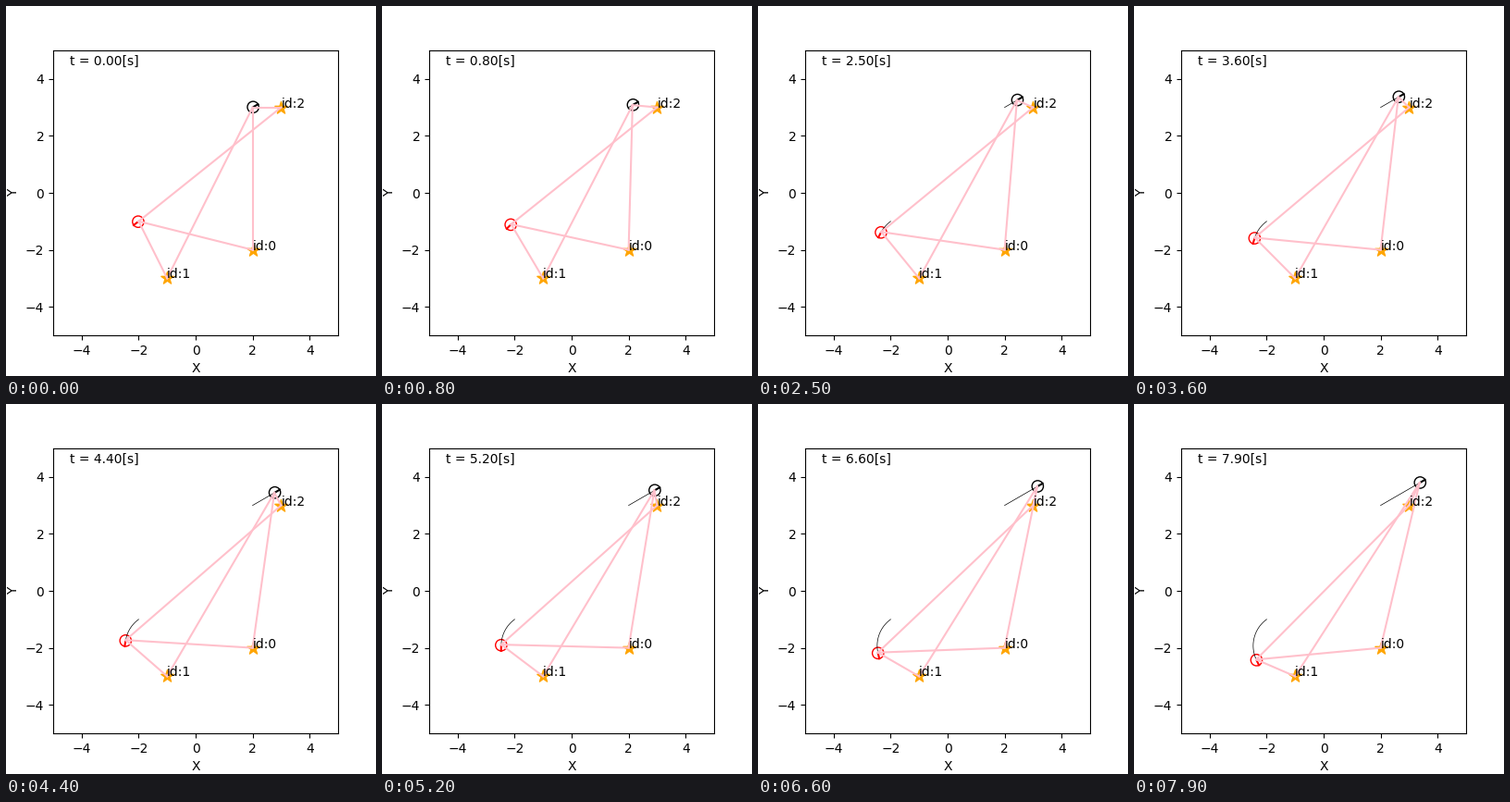
A matplotlib script that plays this animation: 400 by 400 pixels, repeating every 8 s.

```python
import numpy as np
import matplotlib.pyplot as plt
from matplotlib.animation import FuncAnimation
from matplotlib.patches import Circle

DT = 0.1
FRAMES = 80
RADIUS = 0.2
LANDMARKS = [(2, -2), (-1, -3), (3, 3)]


class Robot:
    """Moves with constant speed nu and turn rate omega, sighting every landmark."""

    def __init__(self, ax, start, nu, omega, color):
        self.start, self.nu, self.omega = start, nu, omega
        self.heading, = ax.plot([], [], color=color)
        self.body = ax.add_patch(Circle(start[:2], RADIUS, fill=False, color=color))
        self.trail, = ax.plot([], [], linewidth=0.5, color="black")
        self.sights = [ax.plot([], [], color="pink")[0] for _ in LANDMARKS]

    def pose(self, t):
        x, y, a = self.start
        b = a + self.omega * t
        if self.omega == 0:
            return x + self.nu * t * np.cos(a), y + self.nu * t * np.sin(a), b + 0 * t
        r = self.nu / self.omega
        return x + r * (np.sin(b) - np.sin(a)), y + r * (np.cos(a) - np.cos(b)), b

    def update(self, step):
        xs, ys, angles = self.pose(DT * np.arange(step + 1))
        x, y, a = xs[-1], ys[-1], angles[-1]
        self.heading.set_data([x, x + RADIUS * np.cos(a)], [y, y + RADIUS * np.sin(a)])
        self.body.center = x, y
        self.trail.set_data(xs, ys)
        # Sightings lag one step behind the body.
        for line, (lx, ly) in zip(self.sights, LANDMARKS):
            line.set_data([xs[-2], lx], [ys[-2], ly])


fig = plt.figure(figsize=(4, 4), dpi=100)
ax = fig.add_subplot(111)
ax.set_aspect("equal")
ax.set_xlim(-5, 5)
ax.set_ylim(-5, 5)
ax.set_xlabel("X", fontsize=10)
ax.set_ylabel("Y", fontsize=10)

clock = ax.text(-4.4, 4.5, "", fontsize=10)
for i, (lx, ly) in enumerate(LANDMARKS):
    ax.scatter(lx, ly, s=100, marker="*", color="orange")
    ax.text(lx, ly, f"id:{i}", fontsize=10)

robots = [
    Robot(ax, (2, 3, np.pi / 6), 0.2, 0.0, "black"),
    Robot(ax, (-2, -1, np.pi * 6 / 5), 0.2, np.radians(10), "red"),
]


def draw(frame):
    clock.set_text(f"t = {frame * DT:.2f}[s]")
    for robot in robots:
        robot.update(frame + 1)


anim = FuncAnimation(fig, draw, frames=FRAMES, interval=1000 * DT, repeat=True,
                     repeat_delay=0)
plt.show()
```
